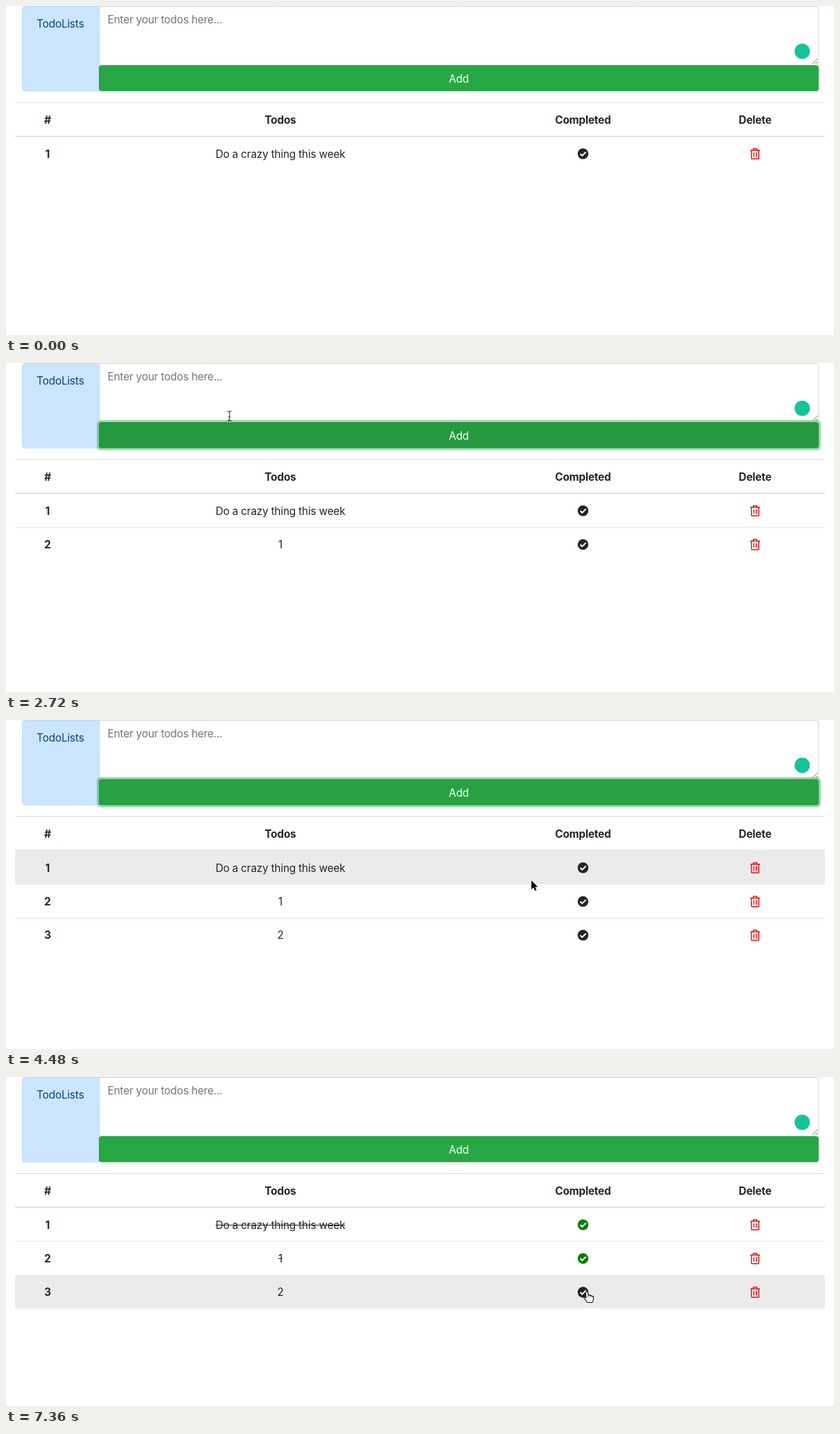
Recreate the animation shown at these times as an HTML page with a canvas. Size 1186x472 px, loop 8 s.

```html
<!DOCTYPE html>
<html lang="en">
<head>
<meta charset="utf-8">
<title>Todo list</title>
<style>
  html, body { margin: 0; width: 100%; height: 100%; overflow: hidden; background: #fff; }
  canvas { display: block; width: 1186px; height: 472px; }
</style>
</head>
<body>
<canvas id="stage" width="1186" height="472"></canvas>
<script>
const ctx = document.getElementById('stage').getContext('2d');
const LOOP = 8000, STEP = 160;
const INK = '#212529', LINE = '#dee2e6';
const COL = { num: 59.5, todo: 393, done: 826.5, del: 1073 };
const ROW_TOP = 187, ROW_H = 48.4;

// Pointer hotspot: time, x, y
const PATH = [
  [160, 28, 184], [480, 150, 105], [800, 312, 45], [1920, 312, 45],
  [2080, 317, 70], [2240, 324, 88], [2400, 325, 96], [2560, 325, 96],
  [2720, 320, 76], [2880, 312, 45], [3680, 312, 45], [3840, 318, 70],
  [4000, 328, 98], [4160, 332, 102], [4320, 430, 112], [4480, 752.5, 230],
  [4800, 795, 222], [5280, 826, 213], [5760, 826, 213], [5920, 826, 224],
  [6240, 827, 263], [6880, 827, 263], [7040, 828, 276], [7360, 832, 308]
];
const CLICKS = [800, 2400, 3040, 4160, 5600, 6720];
const ROWS = [
  { text: 'Do a crazy thing this week', from: 0, done: 5760 },
  { text: '1', from: 2560, done: 6880 },
  { text: '2', from: 4320, done: Infinity }
];

const HAND = new Path2D('M-1.7 1Q0-1.4 1.5 1L2 5Q4 4 5 5.5Q7 5 7.6 6.6Q9.6 6 9.7 8.2Q9.6 12 7.7 15.5L.5 15.5Q-1 12.5-4 9.6Q-4.6 6.6-1 9Z');
const KNUCKLES = new Path2D('M2 5V8M5 5.6V8M7.6 6.6V8.4');
const ARROW = new Path2D('M0 0V13L3 10.2L5.2 15L7.5 14L5.3 9.4H9.2Z');
const BEAM = new Path2D('M-3-7Q0-7 0-5Q0-7 3-7M0-5V5M-3 7Q0 7 0 5Q0 7 3 7M-1.6 1.5H1.6');
const TRASH = new Path2D('M-7-4.9H7M-3.2-5L-2.2-7.3H2.2L3.2-5M-5.3-4.9V6.2Q-5.3 7.3-4.2 7.3H4.2Q5.3 7.3 5.3 6.2V-4.9M-1.8-2V4.6M1.8-2V4.6');
const TICK = new Path2D('M-4 .1L-1.2 2.8L4.2-2.5');

const during = (t, a, b) => t >= a && t < b;
const ease = (t, start) => Math.max(0, Math.min(1, (t - start) / 150));
const pulse = (t, on, off) => ease(t, on) - ease(t, off);
const mix = (a, b, k) => `rgb(${a.map((v, i) => Math.round(v + (b[i] - v) * k))})`;

function text(str, x, y, color = INK, weight = 400, align = 'center') {
  ctx.font = `${weight} 15.25px Inter, "Liberation Sans", sans-serif`;
  ctx.letterSpacing = '-0.18px';
  ctx.textAlign = align;
  ctx.fillStyle = color;
  ctx.fillText(str, x, y + 5.5);
  return ctx.measureText(str).width;
}

function box(x, y, w, h, radii, fill, stroke) {
  ctx.beginPath();
  ctx.roundRect(x, y, w, h, radii);
  ctx.fillStyle = fill;
  ctx.fill();
  if (stroke) {
    ctx.strokeStyle = stroke;
    ctx.lineWidth = 1;
    ctx.stroke();
  }
}

function rect(x, y, w, h, color) {
  ctx.fillStyle = color;
  ctx.fillRect(x, y, w, h);
}

function disc(x, y, r, color) {
  ctx.beginPath();
  ctx.arc(x, y, r, 0, Math.PI * 2);
  ctx.fillStyle = color;
  ctx.fill();
}

function at(x, y, draw) {
  ctx.save();
  ctx.translate(x, y);
  draw();
  ctx.restore();
}

function outline(path, color, width) {
  ctx.strokeStyle = color;
  ctx.lineWidth = width;
  ctx.stroke(path);
}

function pointerAt(t) {
  if (t < PATH[0][0]) return null;
  const i = PATH.findIndex(p => p[0] > t);
  if (i < 0) return PATH[PATH.length - 1].slice(1);
  const [t0, x0, y0] = PATH[i - 1], [t1, x1, y1] = PATH[i];
  const k = (t - t0) / (t1 - t0);
  return [x0 + (x1 - x0) * k, y0 + (y1 - y0) * k];
}

function drawForm(t) {
  const focus = pulse(t, 800, 2400) + pulse(t, 2960, 4160);
  const hover = pulse(t, 2160, 2640) + pulse(t, 3900, 4360);
  const ring = pulse(t, 2400, 2860) + pulse(t, 4160, 5440);

  box(23.5, 0.5, 110, 121.5, [4, 0, 0, 4], '#cce5ff', '#b8daff');
  text('TodoLists', 77.8, 25, '#004085');

  if (focus > 0) box(130, -3, 1037.2, 91, 6, `rgba(0,123,255,${0.25 * focus})`);
  box(133.5, 0.5, 1030.5, 84, [0, 4, 4, 0], '#fff', mix([206, 212, 218], [128, 189, 255], focus));

  const typed = during(t, 1600, 2560) ? '1' : during(t, 3520, 4320) ? '2' : '';
  if (typed) text(typed, 146, 19, '#495057', 400, 'left');
  else text('Enter your todos here...', 145.5, 19, '#6c757d', 400, 'left');

  const caret = during(t, 800, 1280) || during(t, 1600, 2080) ||
    during(t, 3040, 3360) || during(t, 3520, 3840);
  if (caret) rect(typed ? 155 : 146, 10, 1, 18, '#343a40');

  ctx.strokeStyle = '#777';
  ctx.lineWidth = 1;
  ctx.beginPath();
  ctx.moveTo(1155, 83); ctx.lineTo(1162.5, 75.5);
  ctx.moveTo(1159.5, 83); ctx.lineTo(1162.5, 80);
  ctx.stroke();

  disc(1140.5, 65, 11, '#15c39a');
  if (during(t, 3040, 3360)) {
    const a = (t - 3040) / 160 * 1.6 - 1.1;
    ctx.beginPath();
    ctx.arc(1140.5, 65, 5.8, a, a + 2.7);
    ctx.strokeStyle = '#fff';
    ctx.lineWidth = 1.4;
    ctx.stroke();
  }

  if (ring > 0) box(130, 81.8, 1037.2, 43.4, 6, `rgba(72,180,97,${0.5 * ring})`);
  box(133, 85, 1031.2, 37.2, 4, mix([40, 167, 69], [33, 136, 56], hover));
  text('Add', 648.7, 104, '#fff');
}

function drawRow(row, i, t) {
  const y = 212 + i * ROW_H;
  const done = t >= row.done;
  text(String(i + 1), COL.num, y, INK, 700);
  const w = text(row.text, COL.todo, y);
  if (done) rect(COL.todo - w / 2, Math.round(y), w, 1, INK);
  at(COL.done, y, () => {
    disc(0, 0, 7.7, done ? '#008000' : INK);
    outline(TICK, '#fff', 2);
  });
  at(COL.del, y, () => outline(TRASH, '#f01010', 1.5));
}

function drawTable(t, pointer) {
  const rows = ROWS.filter(r => t >= r.from);
  rect(13, 138, 1160, 1, LINE);
  text('#', COL.num, 163, INK, 700);
  text('Todos', COL.todo, 163, INK, 700);
  text('Completed', COL.done, 163, INK, 700);
  text('Delete', COL.del, 163, INK, 700);
  rect(13, 186, 1160, 2, LINE);
  rows.forEach((r, i) => { if (i) rect(13, Math.round(ROW_TOP + i * ROW_H), 1160, 1, LINE); });

  const over = pointer ? Math.floor((pointer[1] - ROW_TOP) / ROW_H) : -1;
  if (over >= 0 && over < rows.length) {
    const top = Math.round(ROW_TOP + over * ROW_H) - (over ? 0 : 1);
    const bottom = Math.round(ROW_TOP + (over + 1) * ROW_H) + (over < 2 ? 1 : 0);
    rect(13, top, 1160, bottom - top, '#ebebeb');
  }
  rows.forEach((r, i) => drawRow(r, i, t));
}

function drawPointer(t, [x, y]) {
  const inForm = x > 133 && x < 1164;
  const onText = inForm && y < 85;
  const onButton = inForm && y >= 85 && y < 122;
  const onIcon = Math.abs(x - COL.done) < 8 &&
    ROWS.some((r, i) => Math.abs(y - 212 - i * ROW_H) < 8);

  if (CLICKS.includes(t)) {
    ctx.beginPath();
    ctx.arc(x, y, 16.3, 0, Math.PI * 2);
    ctx.fillStyle = 'rgba(255,255,255,.3)';
    ctx.fill();
    ctx.strokeStyle = '#222';
    ctx.lineWidth = 1.1;
    ctx.stroke();
  }
  at(x, y, () => {
    ctx.lineJoin = 'round';
    if (onText) {
      outline(BEAM, '#333', 1.1);
    } else if (onButton || onIcon) {
      ctx.fillStyle = '#fff';
      ctx.fill(HAND);
      outline(HAND, '#111', 1.1);
      outline(KNUCKLES, '#111', 0.8);
    } else {
      outline(ARROW, '#fff', 2);
      ctx.fillStyle = '#000';
      ctx.fill(ARROW);
    }
  });
}

function frame(now) {
  const t = Math.floor(now % LOOP / STEP) * STEP;
  const pointer = pointerAt(t);
  rect(0, 0, 1186, 472, '#fff');
  drawForm(t);
  drawTable(t, pointer);
  if (pointer) drawPointer(t, pointer);
  requestAnimationFrame(() => frame(performance.now() - start));
}

const start = performance.now();
frame(0);
</script>
</body>
</html>
```
